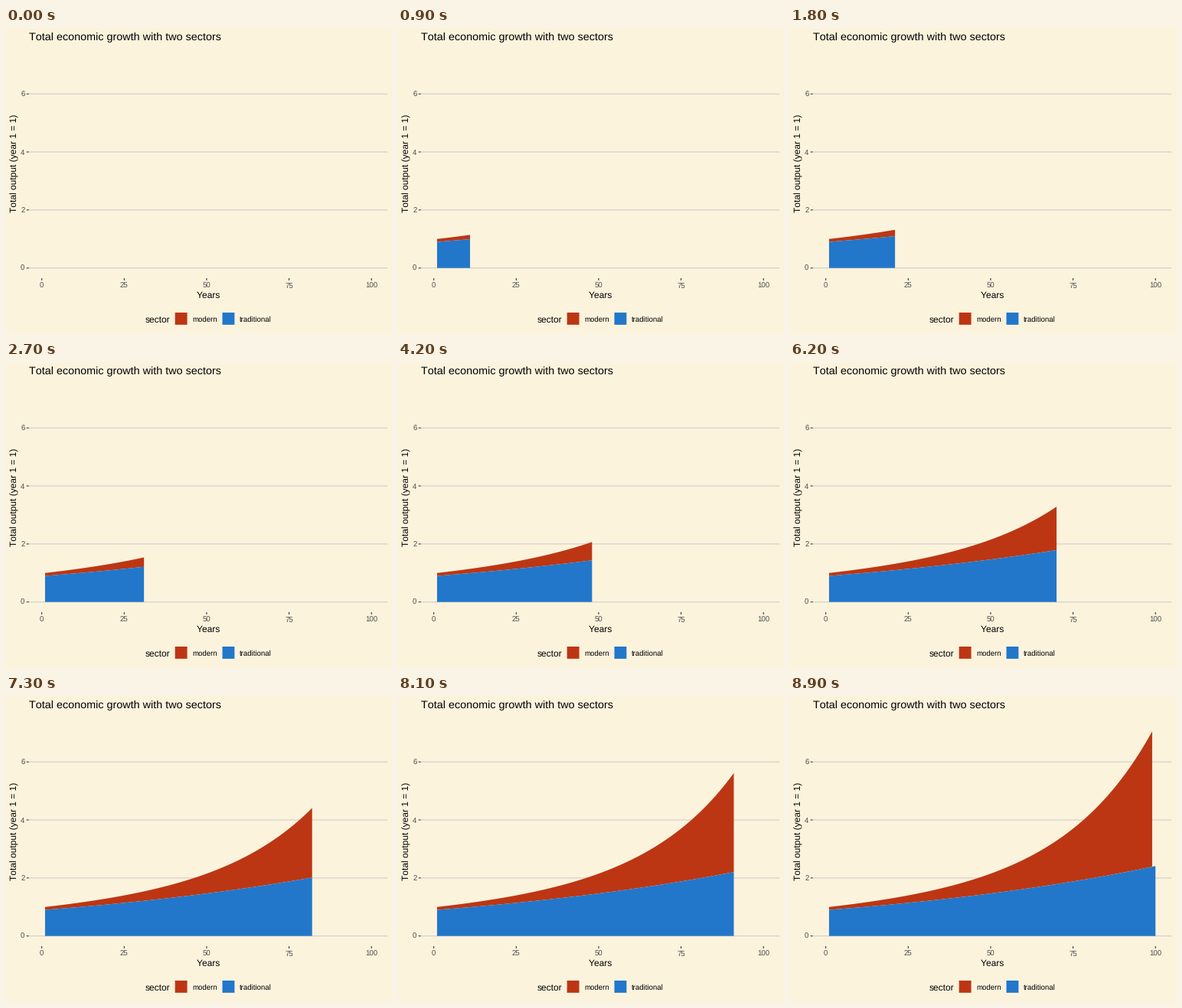
Animation of 504x400 px, one loop 10000 ms. Source, as a matplotlib script:

```python
import numpy as np
import matplotlib.pyplot as plt
from matplotlib.animation import FuncAnimation
from matplotlib.patches import Polygon, Rectangle

plt.rcParams.update({
    "font.family": "Liberation Sans",
    "text.hinting": "none",
    "text.kerning_factor": 10,  # large enough to switch kerning off
})

W, H, DPI = 504, 400, 100
CREAM, GRID, INK, GREY = "#FCF3DD", "#CCCCCC", "#333333", "#4D4D4D"
RED, BLUE = "#BD3613", "#2277CA"
LEFT, RIGHT, BOTTOM = 29.8, 498, 327
MOVING, TOTAL = 90, 100
LAST_YEAR = 100

fig = plt.figure(figsize=(W / DPI, H / DPI), dpi=DPI, facecolor=CREAM)
ax = fig.add_axes([0, 0, 1, 1])
ax.set_xlim(0, W)
ax.set_ylim(H, 0)
ax.axis("off")


def px(year):
    return 46.7 + 4.305 * year


def py(output):
    return 313.7 - 37.92 * output


def label(x, y, text, size, color="black", ha="left", **kw):
    ax.text(x, y, text, fontsize=size * 72 / DPI, color=color, ha=ha,
            va=kw.pop("va", "baseline"), **kw)


def line(xs, ys, color, z):
    ax.plot(xs, ys, color=color, lw=1.07 * 72 / DPI, zorder=z, snap=False,
            solid_capstyle="butt")


def area(color):
    shape = Polygon(np.zeros((3, 2)), fc=color, lw=0, zorder=2, snap=False)
    return ax.add_patch(shape)


def key(x, color, text):
    ax.add_patch(Rectangle((x + 0.7, 372), 15.9, 15.9, fc=color, lw=0,
                           snap=False))
    label(x + 23.3, 383.6, text, 9.6)


# Axes
for v in (0, 2, 4, 6):
    line([LEFT, RIGHT], [py(v)] * 2, GRID, 1)
    line([LEFT - 3, LEFT], [py(v)] * 2, INK, 3)
    label(24.4, py(v) + 3.5, str(v), 9.6, GREY, "right")
for v in range(0, 101, 25):
    line([px(v)] * 2, [BOTTOM, BOTTOM + 3], INK, 3)
    label(px(v), 339.8, str(v), 9.6, GREY, "center")

# Titles and legend
label(30, 16.2, "Total economic growth with two sectors", 14.4)
label(264, 353, "Years", 12, ha="center")
label(14.6, 176.5, "Total output (year 1 = 1)", 12, ha="right", va="center",
      rotation=90, rotation_mode="default") if False else ax.text(
    14.6, 176.5, "Total output (year 1 = 1)", fontsize=12 * 72 / DPI,
    ha="center", va="baseline", rotation=90, rotation_mode="anchor")
label(181.3, 384.8, "sector", 12)
key(220, RED, "modern")
key(281.8, BLUE, "traditional")

modern, traditional = area(RED), area(BLUE)


def outputs(years):
    base = 0.9 * 1.01 ** (years - 1)
    return base, base + 0.1 * 1.04 ** (years - 1)


def band(years, low, high):
    xs = px(years)
    return np.column_stack([np.r_[xs, xs[::-1]],
                            np.r_[py(high), py(low)[::-1]]])


def draw(frame):
    step = min(frame, MOVING - 1)
    year = int(1 + (step + 0.5) * (LAST_YEAR - 1) / (MOVING - 1))
    years = np.arange(1, year + 1)
    base, top = outputs(years)
    traditional.set_xy(band(years, 0 * base, base))
    # the modern sector's last year lies beyond the axis limit
    n = min(year, LAST_YEAR - 1)
    modern.set_xy(band(years[:n], base[:n], top[:n]))
    return modern, traditional


anim = FuncAnimation(fig, draw, frames=TOTAL, interval=100, repeat=True,
                     repeat_delay=0, init_func=lambda: draw(0))
plt.show()
```
